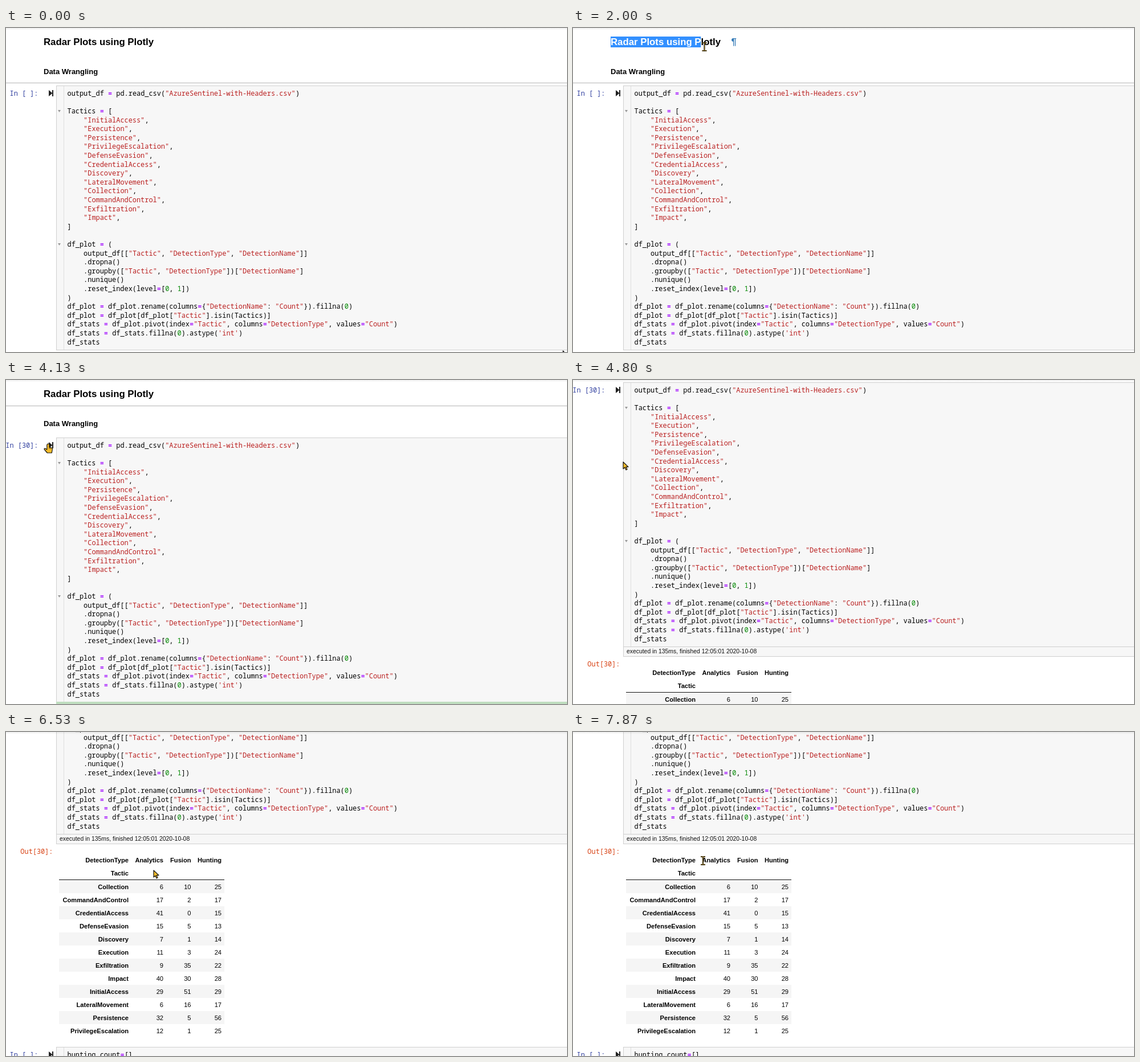
Write an HTML page with a canvas that moves like this. It is 984 px wide and 569 px high and loops after 8 s.

```html
<!DOCTYPE html>
<html lang="en">
<head>
<meta charset="utf-8">
<title>Notebook</title>
<style>
html, body { margin: 0; width: 100%; height: 100%; overflow: hidden; background: #fff; }
canvas { display: block; }
</style>
</head>
<body>
<canvas id="stage" width="984" height="569"></canvas>
<script>
const LOOP = 8000, W = 984, H = 569;
const g = document.getElementById('stage').getContext('2d');
const SANS = '"Liberation Sans", Arial, sans-serif';
const MONO = '11.92px "Noto Sans Mono", monospace';
const TITLE = 'bold 16.8px ' + SANS;
const PITCH = 7.152, LINE = 15.6;

const code = `output_df = pd.read_csv("AzureSentinel-with-Headers.csv")

Tactics = [
    "InitialAccess",
    "Execution",
    "Persistence",
    "PrivilegeEscalation",
    "DefenseEvasion",
    "CredentialAccess",
    "Discovery",
    "LateralMovement",
    "Collection",
    "CommandAndControl",
    "Exfiltration",
    "Impact",
]

df_plot = (
    output_df[["Tactic", "DetectionType", "DetectionName"]]
    .dropna()
    .groupby(["Tactic", "DetectionType"])["DetectionName"]
    .nunique()
    .reset_index(level=[0, 1])
)
df_plot = df_plot.rename(columns={"DetectionName": "Count"}).fillna(0)
df_plot = df_plot[df_plot["Tactic"].isin(Tactics)]
df_stats = df_plot.pivot(index="Tactic", columns="DetectionType", values="Count")
df_stats = df_stats.fillna(0).astype('int')
df_stats`;

const table = `Collection 6 10 25
CommandAndControl 17 2 17
CredentialAccess 41 0 15
DefenseEvasion 15 5 13
Discovery 7 1 14
Execution 11 3 24
Exfiltration 9 35 22
Impact 40 30 28
InitialAccess 29 51 29
LateralMovement 6 16 17
Persistence 32 5 56
PrivilegeEscalation 12 1 25`.split('\n').map(row => row.split(' '));
const COLUMNS = [215, 276, 324.5, 378];
const ROWS_TOP = 646, ROW = 23;

// time, x, y, pointer shape from then on
const pointer = [
  [0, 977, 567, 'arrow'], [70, 977, 567, 'beam'], [400, 296, 187, 'beam'], [670, 296, 187, 'beam'],
  [1130, 73, 22, 'beam'], [1270, 73, 22, 'beam'], [1530, 71, 22, 'beam'], [1730, 71, 22, 'beam'],
  [2000, 230.5, 33, 'beam'], [2330, 256, 33, 'beam'], [2530, 256, 33, 'beam'], [2630, 235, 42, 'arrow'],
  [2970, 98, 132, 'arrow'], [3200, 77, 113, 'hand'], [3330, 76, 111, 'hand'], [3600, 76, 111, 'hand'],
  [3870, 74, 112, 'hand'], [4150, 74, 112, 'arrow'], [4400, 88, 141, 'arrow'], [4470, 88, 144, 'arrow'],
  [5670, 88, 144, 'arrow'], [6470, 259, 243, 'arrow'], [6530, 259, 243, 'arrow'], [6800, 256, 455, 'arrow'],
  [6930, 256, 455, 'arrow'], [7330, 272, 236, 'arrow'], [7400, 272, 236, 'arrow'],
  [7730, 231, 227, 'beam'], [7870, 228, 226, 'beam'], [LOOP, 228, 226, 'beam']
];
const selection = [[0, 66], [1730, 66], [2000, 225], [2330, 260], [LOOP, 260]];

const shapes = {
  arrow: new Path2D('M0 0v12l3-2.6 2 4.6 2-1-2-4.4h4z'),
  hand: new Path2D('M0 0c1.5 0 2 1 2 2v4l4 1c1.5 .5 1.5 1.5 1.3 3l-1 6h-8l-5-6c-1-1.5 1-2.5 2.5-1.3l2 1.5V2C-2 1-1.5 0 0 0z'),
  beam: new Path2D('M-4-7h2.5q1.5 0 1.5 1.5v11q0 1.5-1.5 1.5H-4M4-7H1.5Q0-7 0-5.5M4 7H1.5Q0 7 0 5.5')
};

function track(keys, t) {
  let i = 0;
  while (i < keys.length - 2 && t >= keys[i + 1][0]) i++;
  const a = keys[i], b = keys[i + 1];
  const p = (t - a[0]) / (b[0] - a[0]), e = p * p * (3 - 2 * p);
  return a.slice(1).map((v, k) => typeof v === 'number' ? v + (b[k + 1] - v) * e : v);
}

function rect(x, y, w, h, color) {
  g.fillStyle = color;
  g.fillRect(x, y, w, h);
}

function text(s, x, y, font, color = '#000', align = 'left') {
  g.font = font;
  g.fillStyle = color;
  g.textAlign = align;
  g.fillText(s, x, y);
}

function triangle(x1, y1, x2, y2, x3, y3, color) {
  g.fillStyle = color;
  g.beginPath();
  g.moveTo(x1, y1);
  g.lineTo(x2, y2);
  g.lineTo(x3, y3);
  g.fill();
}

function codeLine(line, y) {
  let x = 107.5;
  for (const part of line.split(/("[^"]*"|'[^']*'|=|\b\d\b)/)) {
    const op = part === '=';
    const color = op ? '#a2f' : /^["']/.test(part) ? '#ba2121' : /^\d$/.test(part) ? '#080' : '#000';
    text(part, x, y, (op ? 'bold ' : '') + MONO, color);
    x += part.length * PITCH;
  }
}

function cell(top, height, source, label) {
  rect(88, top, W, height, '#cfcfcf');
  rect(89, top + 1, W, height - 2, '#f7f7f7');
  rect(101, top + 1, 1, height - 2, '#ddd');
  text(label, 56.5, top + 18, MONO, '#303f9f', 'right');
  triangle(75, top + 8, 81.5, top + 13.5, 75, top + 19, '#222');
  rect(81, top + 8, 2, 11, '#222');
  source.split('\n').forEach((line, i) => {
    const y = Math.round(top + 17.8 + i * LINE);
    codeLine(line, y);
    if (/[[(]$/.test(line)) triangle(91, y - 6, 96, y - 6, 93.5, y - 2, '#999');
  });
}

function heading(t) {
  const title = 'Radar Plots using Plotly', x = 66;
  text(title, x, 30, TITLE);
  if (t < 1730 || t >= 3730) return;
  const limit = track(selection, t)[0];
  let end = x;
  for (let i = 1; i <= title.length; i++) {
    const edge = x + g.measureText(title.slice(0, i)).width;
    if (edge <= limit + 2) end = edge;
  }
  g.save();
  g.beginPath();
  g.rect(x, 15, end - x, 19);
  g.clip();
  rect(x, 15, end - x, 19, '#3390ff');
  text(title, x, 30, TITLE, '#fff');
  g.restore();
}

// The bar flashes green when the run ends, then fades to grey.
function timing(t) {
  const glow = Math.max(0, Math.min(0.45, 0.45 * (4400 - t) / 530));
  rect(88, 565, W, 18, glow ? '#f7f7f7' : '#cfcfcf');
  rect(89, 566, W, 16, '#f7f7f7');
  rect(88, 565, W, 18, `rgba(0,136,0,${glow})`);
  text('executed in 135ms, finished 12:05:01 2020-10-08', 94, 577, '10.4px ' + SANS, '#111');
}

function output(hover) {
  const bold = 'bold 11.14px ' + SANS, plain = '11.14px ' + SANS;
  text('Out[30]:', 82.5, 600, MONO, '#d84315', 'right');
  ['DetectionType', 'Analytics', 'Fusion', 'Hunting'].forEach((s, i) =>
    text(s, COLUMNS[i], 615, bold, '#000', 'right'));
  text('Tactic', COLUMNS[0], 638, bold, '#000', 'right');
  table.forEach((row, r) => {
    const y = ROWS_TOP + r * ROW;
    rect(93, y, 290, ROW, r === hover ? '#d9edfd' : r % 2 ? '#fff' : '#f5f5f5');
    row.forEach((s, i) => text(s, COLUMNS[i], y + 16, i ? plain : bold, '#000', 'right'));
  });
  rect(93, 645, 290, 1, '#111');
}

function drawPointer(x, y, kind) {
  g.save();
  g.translate(x, y);
  g.lineJoin = 'round';
  g.strokeStyle = '#111';
  if (kind === 'beam') {
    g.lineWidth = 2.2;
    g.stroke(shapes.beam);
    g.strokeStyle = '#e8b020';
    g.lineWidth = 0.6;
    g.stroke(shapes.beam);
  } else {
    g.lineWidth = 1.2;
    g.fillStyle = '#f6bd2b';
    g.fill(shapes[kind]);
    g.stroke(shapes[kind]);
    if (kind === 'hand') {
      g.lineWidth = 0.7;
      g.stroke(new Path2D('M2 6v3M4.3 6.5v3'));
    }
  }
  g.restore();
}

function draw(t) {
  const [x, y, kind] = track(pointer, t);
  const scroll = t < 4800 ? 0 : t < 4930 ? 97 : t < 5200 ? 290 : 386;
  const ran = t >= 3730;
  const hover = x > 93 && x < 383 ? Math.floor((y + scroll - ROWS_TOP) / ROW) : -1;

  rect(0, 0, W, H, '#fff');
  g.save();
  g.translate(0, -scroll);
  heading(t);
  if (y < 45 && t < 3000) text('¶', 277.5, 30, TITLE, '#337ab7');
  text('Data Wrangling', 66, 81, 'bold 13px ' + SANS);
  rect(0, t < 2730 ? 96 : 45, W, 1, '#b3b3b3');
  cell(101, 465, code, ran ? 'In [30]:' : 'In [ ]:');
  if (ran) {
    timing(t);
    output(hover);
    cell(939, 60, 'hunting_count=[]', 'In [ ]:');
  }
  g.restore();

  const shade = g.createLinearGradient(0, 0, 0, 4);
  shade.addColorStop(0, 'rgba(87,87,87,.09)');
  shade.addColorStop(1, 'rgba(87,87,87,0)');
  rect(0, 0, W, 4, shade);
  drawPointer(x, y, kind);
}

const start = performance.now();
function tick() {
  draw((performance.now() - start) % LOOP);
  requestAnimationFrame(tick);
}
tick();
</script>
</body>
</html>
```
